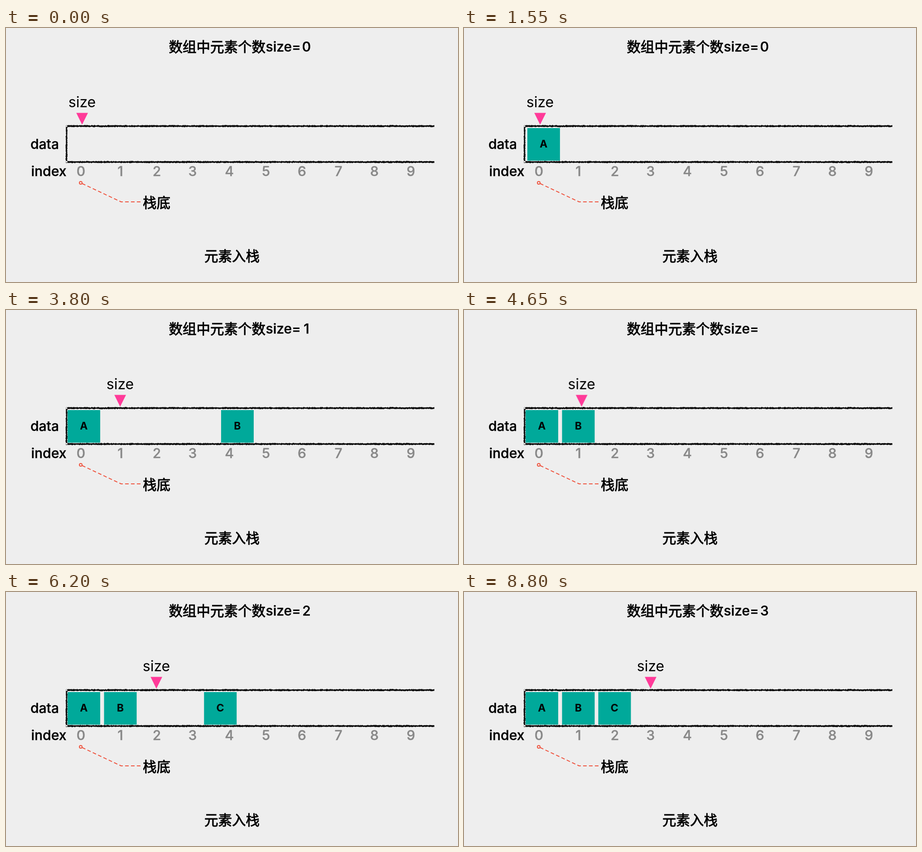
These frames come from a looping animation (998 px wide and 561 px high, 9050 ms). An HTML page:

```html
<!DOCTYPE html>
<html lang="zh">
<head>
<meta charset="utf-8">
<title>元素入栈</title>
<style>
  html, body { margin: 0; width: 100%; height: 100%; overflow: hidden; background: #eee; }
  #stage { position: relative; width: 998px; height: 561px; overflow: hidden; }
  svg { position: absolute; left: 0; top: 0; width: 998px; height: 561px; }
  text { font: 500 30px Inter, sans-serif; stroke: #000; stroke-width: .4; }
  .cjk { font: 400 30.5px "Noto Sans CJK SC", "Noto Sans CJK", sans-serif; stroke-width: .9; }
  .mid { text-anchor: middle; }
  .index { fill: #888; stroke: #888; }
  .block, .pointer { position: absolute; left: 0; will-change: transform; }
  .block {
    top: 221px; width: 71.7px; height: 71.5px; background: #00a99a;
    font: 700 23px/71.5px Inter, sans-serif; text-align: center;
  }
  .pointer { top: 0; width: 80px; height: 220px; }
  .pointer svg { width: 80px; height: 220px; }
  .pointer text { font-size: 32px; font-weight: 400; stroke: none; }
</style>
</head>
<body>
<div id="stage">
  <svg viewBox="0 0 998 561">
    <text class="cjk" x="359.5" y="52.5">数组中元素个数</text>
    <text x="573.5" y="52">size=</text>
    <g id="counts"></g>

    <text x="54" y="267">data</text>
    <text x="55.5" y="326.5">index</text>
    <g id="indices"></g>

    <g fill="none" stroke="#ef5540" stroke-width="2">
      <circle cx="165" cy="342" r="3"/>
      <path d="M168 343.5L254 384H298" stroke-dasharray="8 5"/>
    </g>
    <text class="cjk" x="302" y="397">栈底</text>
    <text class="cjk mid" x="499" y="515">元素入栈</text>

    <path id="frame" fill="#0a0a0a"/>
  </svg>
  <div class="pointer" id="pointer">
    <svg viewBox="-40 0 80 220">
      <text class="mid" y="175">size</text>
      <path d="M-12.8 187.5H13L0 213.5Z" fill="#ff3b99"/>
    </svg>
  </div>
</div>
<script>
const LOOP = 9050, EDGE = 1000;
const SLIDE = 495, SLIDE_EASE = 'cubic-bezier(.3, .1, .25, 1)';
const SHIFT = 530, SHIFT_EASE = 'cubic-bezier(.333, 0, .667, 1)';
const indexX = [165.5, 252.5, 333, 412, 493, 574, 653.5, 734, 813.5, 894];
const pointerX = [168, 252, 332, 412];
const pushes = [
  { name: 'A', x: 136, enter: 1100, shift: 2350, hide: 2400, show: 2900 },
  { name: 'B', x: 216.5, enter: 3600, shift: 4550, hide: 4600, show: 5150 },
  { name: 'C', x: 296.5, enter: 5950, shift: 7350, hide: 7400, show: 7950 }
];

const $ = id => document.getElementById(id);

function addText(parent, attrs, text) {
  const el = document.createElementNS('http://www.w3.org/2000/svg', 'text');
  for (const key in attrs) el.setAttribute(key, attrs[key]);
  el.textContent = text;
  return parent.appendChild(el);
}

// Each step is [time, value, easing towards the next step]
function play(el, prop, steps) {
  const frames = steps.map(([time, value, easing = 'linear']) =>
    ({ offset: time / LOOP, [prop]: value, easing }));
  el.animate(frames, { duration: LOOP, iterations: Infinity });
}
const shiftX = x => `translateX(${x}px)`;

let seed = 7;
const random = () => (seed = seed * 16807 % 2147483647) / 2147483647;

// Charcoal line with ragged edges
function rough(from, to, centre, half, vertical) {
  const near = [], far = [];
  for (let s = from; s <= to; s += 1.3) {
    const a = centre - half - (random() - .5) * 1.5;
    const b = centre + half + (random() - .5) * 1.5;
    near.push(vertical ? [a, s] : [s, a]);
    far.unshift(vertical ? [b, s] : [s, b]);
  }
  const points = near.concat(far).map(p => p.map(v => v.toFixed(1)).join(' '));
  return 'M' + points.join('L') + 'Z';
}

$('frame').setAttribute('d',
  rough(132, 946, 216.7, 1.9) + rough(132, 946, 296, 1.9) + rough(215, 298, 133.7, 1.7, true));

indexX.forEach((x, i) => addText($('indices'), { class: 'mid index', x, y: 326.5 }, i));

for (const p of pushes) {
  const block = document.createElement('div');
  block.className = 'block';
  block.textContent = p.name;
  $('stage').append(block);
  play(block, 'transform', [
    [0, shiftX(EDGE)],
    [p.enter, shiftX(EDGE), SLIDE_EASE],
    [p.enter + SLIDE, shiftX(p.x)],
    [LOOP, shiftX(p.x)]
  ]);
}

const pointerAt = i => shiftX(pointerX[i] - 40);
play($('pointer'), 'transform', [
  [0, pointerAt(0)],
  ...pushes.flatMap((p, i) => [
    [p.shift, pointerAt(i), SHIFT_EASE],
    [p.shift + SHIFT, pointerAt(i + 1)]
  ]),
  [LOOP, pointerAt(pushes.length)]
]);

pointerX.forEach((_, i) => {
  const digit = addText($('counts'), { class: 'mid', x: 663.5, y: 52 }, i);
  const show = i ? pushes[i - 1].show : 0;
  const hide = i < pushes.length ? pushes[i].hide : LOOP;
  play(digit, 'opacity', [
    [0, i ? 0 : 1, 'step-end'],
    [show, 1, 'step-end'],
    [hide, 0, 'step-end'],
    [LOOP, 0]
  ]);
});
</script>
</body>
</html>
```
